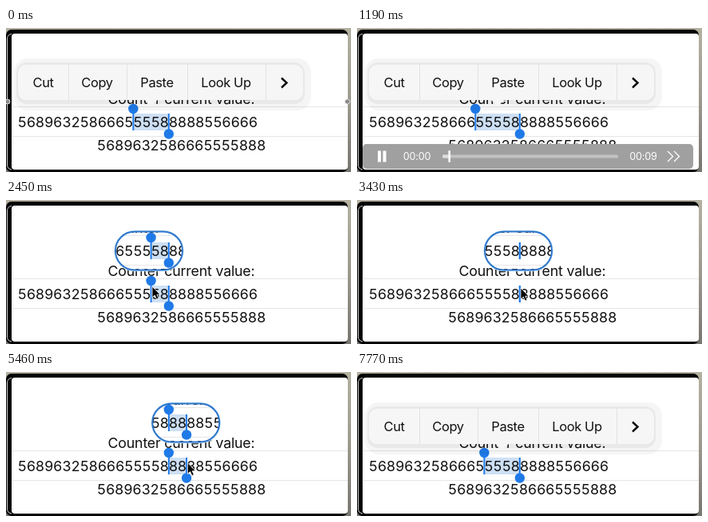
Animation of 432 by 180 pixels, one loop 8.05 s. Source, as an HTML page:

```html
<!DOCTYPE html>
<html lang="en">
<head>
<meta charset="utf-8">
<title>Text selection</title>
<style>
  html, body { margin: 0; width: 100%; height: 100%; overflow: hidden; background: #000; }
  svg { display: block; width: 432px; height: 180px; }
  text { font-family: Inter, Roboto, "Liberation Sans", sans-serif; fill: #111; }
  .label { font-size: 17.8px; letter-spacing: -.2px; text-anchor: middle; }
  .digits { font-size: 17.8px; text-anchor: middle; }
  .menu text { font-size: 16.5px; letter-spacing: -.4px; text-anchor: middle; }
  .player text { font-size: 12.6px; letter-spacing: -.2px; fill: #fff; text-anchor: middle; }
  .handle { fill: #1f7ae8; }
</style>
</head>
<body>
<svg viewBox="0 0 432 180">
  <defs>
    <linearGradient id="edge" x2="0" y2="1">
      <stop offset="0" stop-color="#b5b1a1"/>
      <stop offset=".5" stop-color="#9c998f"/>
      <stop offset="1" stop-color="#77756f"/>
    </linearGradient>
    <clipPath id="screen"><rect x="7" y="7" width="421" height="170" rx="4"/></clipPath>
    <clipPath id="lensClip"><rect x="-42" y="39.500" width="84" height="48" rx="24"/></clipPath>
  </defs>

  <rect width="432" height="180" fill="url(#edge)"/>
  <rect y="2" width="428" height="178" rx="7"/>
  <path d="M7 7.500Q1.500 8 1.500 14V171Q1.500 176 7 177" fill="none" stroke="#d9d9d9"/>

  <g clip-path="url(#screen)">
    <g id="page">
      <rect x="7" y="7" width="421" height="171" fill="#fff"/>
      <path d="M8 98.500H428M8 135.500H428" stroke="#e6e6e7"/>
      <rect id="range" y="107" height="21" fill="#cddff3"/>
      <text class="label" x="219.500" y="94.500">Counter current value:</text>
      <text class="digits" id="field" y="123.700">568963258666555588888556666</text>
      <text class="digits" id="copy" y="152.700">5689632586665555888</text>
      <g id="from" class="handle">
        <rect x="-1" y="107" width="2" height="21"/>
        <circle id="fromDot" cy="101" r="6.200"/>
      </g>
      <g id="to" class="handle">
        <rect x="-1" y="107" width="2" height="21"/>
        <circle id="toDot" cy="132.500" r="6.200"/>
      </g>
    </g>

    <g id="menu" class="menu">
      <rect x="10" y="38" width="372" height="65" rx="17" fill="#000" opacity=".04"/>
      <rect x="13" y="43" width="361" height="52" rx="13" fill="#000" opacity=".05"/>
      <path id="tip" d="M-9 89H9L2 96Q0 98-2 96Z" fill="#f6f6f7"/>
      <rect x="15" y="46" width="357" height="44" rx="10" fill="#f6f6f7"/>
      <path d="M78.500 46V90M151.500 46V90M227.500 46V90M325.500 46V90" stroke="#e2e2e4"/>
      <text x="46.500" y="74">Cut</text>
      <text x="114" y="74">Copy</text>
      <text x="189" y="74">Paste</text>
      <text x="275.500" y="74">Look Up</text>
      <path d="M345 62.500L351.500 68.500L345 74.500" fill="none" stroke="#0b0b0b" stroke-width="2.400"/>
    </g>

    <g id="lens">
      <g clip-path="url(#lensClip)"><use id="lensPage" href="#page" y="-54"/></g>
      <rect x="-43" y="38.500" width="86" height="50" rx="25" fill="none" stroke="#cfe8f5" stroke-width="1.500"/>
      <rect x="-42" y="39.500" width="84" height="48" rx="24" fill="none" stroke="#2d76cc" stroke-width="2"/>
    </g>

    <path id="pointer" d="M0 0V14L3.300 11L5.500 16L8 15L5.900 10.200H10Z" fill="#000" stroke="#fff" stroke-width=".8"/>
  </g>

  <g id="player" class="player">
    <rect x="7" y="145" width="414" height="31" rx="5" fill="#a0a0a0"/>
    <path d="M28 153.500V167.500M34.500 153.500V167.500" stroke="#fff" stroke-width="4"/>
    <text id="clock" x="75" y="165">00:00</text>
    <rect x="107" y="158.500" width="220" height="4" rx="1.500" fill="#c2c2c2"/>
    <rect id="played" x="107" y="158.500" height="4" rx="1.500" fill="#ddd"/>
    <rect id="knob" y="153" width="2.600" height="15" rx="1" fill="#fff"/>
    <text x="358.500" y="165">00:09</text>
    <path d="M389 154L395.500 160.500L389 167M397 154L403.500 160.500L397 167" fill="none" stroke="#fff" stroke-width="1.300"/>
  </g>

  <g id="grips" fill="#888" stroke="#ddd">
    <circle cx="2" cy="92" r="3"/>
    <circle cx="427.500" cy="92" r="3"/>
  </g>
</svg>
<script>
const LOOP = 8050, STEP = 70, HOLD = 7770;
const LEFT = 14.8, PITCH = 11.12, ANCHOR = 17, RESTART = 910;
const $ = id => document.getElementById(id);

// [time, value] steps, linear in between
const dragX = [[1960, 150], [2450, 179], [2800, 187], [3430, 202], [3640, 204],
  [4410, 246], [4550, 247.5], [4830, 258], [5320, 234], [6090, 186],
  [6370, 171.5], [6930, 159]];
const pointerX = [[1680, 148], [1820, 159], [1960, 156], [2450, 183], [3430, 205],
  [4550, 251], [4830, 260], [5320, 236], [6370, 171], [6930, 160]];
const pointerY = [[1680, 99], [1820, 110], [2450, 108], [3430, 110], [4550, 112], [6370, 115]];
const menuFade = [[1960, 1], [2170, 0], [7000, 0], [7280, 1]];
const lensFade = [[1960, 0], [2170, 1], [6930, 1], [7140, 0]];
const playerFade = [[0, 0], [280, 1], [1330, 1], [1610, 0]];

function at(track, t) {
  if (t <= track[0][0]) return track[0][1];
  for (let i = 1; i < track.length; i++) {
    const [t0, a] = track[i - 1], [t1, b] = track[i];
    if (t <= t1) return a + (b - a) * (t - t0) / (t1 - t0);
  }
  return track[track.length - 1][1];
}

const move = (id, x, y = 0) => $(id).setAttribute("transform", `translate(${x} ${y})`);
const fade = (id, value) => $(id).setAttribute("opacity", value);
const set = (id, name, value) => $(id).setAttribute(name, value);
const edgeX = index => LEFT + PITCH * index;

// Equal cells keep the digits aligned with the selection edges.
function layDigits(id, left) {
  const cells = [...$(id).textContent].map((_, i) => (left + PITCH * (i + .5)).toFixed(2));
  set(id, "x", cells.join(" "));
}

function draggedIndex(t) {
  if (t < RESTART) return 13;
  if (t < 1960) return 12;
  return Math.round((at(dragX, t) - LEFT) / PITCH);
}

function draw(time) {
  const t = Math.min(Math.floor(time % LOOP / STEP) * STEP, HOLD);

  const index = draggedIndex(t);
  const from = edgeX(Math.min(index, ANCHOR)), to = edgeX(Math.max(index, ANCHOR));
  const dots = index === ANCHOR ? 0 : 1;
  set("range", "x", from);
  set("range", "width", to - from);
  move("from", from);
  move("to", to);
  fade("fromDot", dots);
  fade("toDot", dots);

  fade("menu", at(menuFade, t));
  move("tip", (from + to) / 2);

  const x = at(dragX, t);
  move("lens", x);
  set("lensPage", "x", -x);
  fade("lens", at(lensFade, t));

  move("pointer", at(pointerX, t), at(pointerY, t));
  fade("pointer", t >= 1680 && t < 7070 ? 1 : 0);

  const knob = t < RESTART ? 324 : 107 + .03 * (t - RESTART);
  fade("player", at(playerFade, t));
  set("knob", "x", knob - 1);
  set("played", "width", Math.max(0, knob - 107));
  $("clock").textContent = t < RESTART ? "00:09" : "00:00";
  fade("grips", t < RESTART ? 1 : 0);
}

layDigits("field", LEFT);
layDigits("copy", 114);

const start = performance.now();
function tick() {
  draw(performance.now() - start);
  requestAnimationFrame(tick);
}
tick();
</script>
</body>
</html>
```
